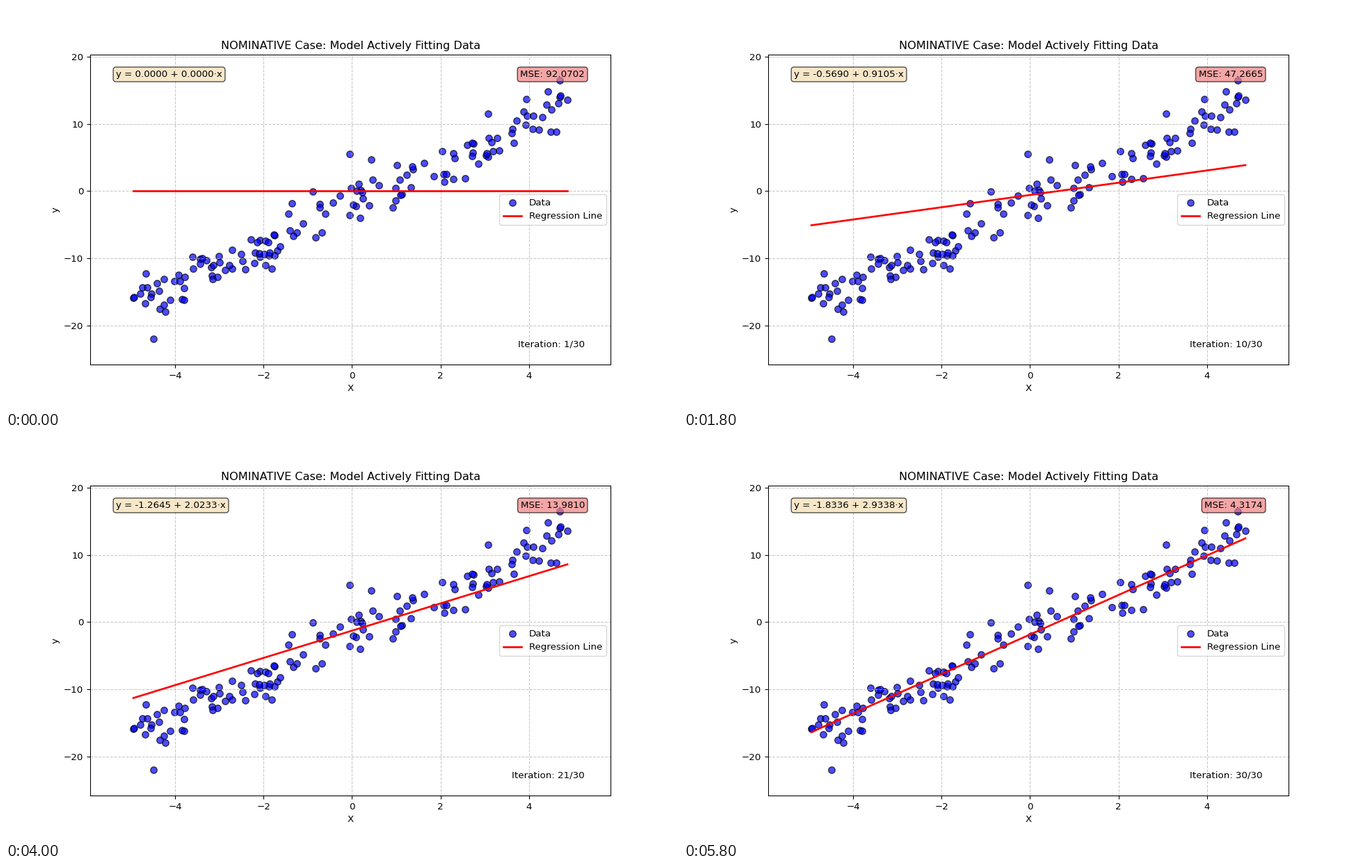
These frames come from a looping animation (966 by 580 pixels, 6000 ms). A matplotlib script:

```python
import numpy as np
import matplotlib.pyplot as plt
from matplotlib.animation import FuncAnimation

STEPS = 30
DPI = 96.6

# Noisy samples of y = 3x - 2
rng = np.random.RandomState(42)
x = 10 * rng.rand(150) - 5
y = 3 * x - 2 + 2 * rng.randn(150)
slope, intercept = np.polyfit(x, y, 1)
ends = np.array([x.min(), x.max()])


def padded(values, share=0.1):
    pad = share * np.ptp(values)
    return values.min() - pad, values.max() + pad


fig, ax = plt.subplots(figsize=(10.00001, 6.0042), dpi=DPI)
ax.scatter(x, y, s=50, color="blue", alpha=0.7, edgecolor="k", label="Data")
line, = ax.plot(ends, 0 * ends, "r-", lw=2, label="Regression Line")
ax.set(xlim=padded(x), ylim=padded(y), xlabel="X", ylabel="y",
       title="NOMINATIVE Case: Model Actively Fitting Data")
ax.grid(True, linestyle="--", alpha=0.7)
ax.legend(loc="center right")


def note(px, py, ha, va, fill=None):
    box = dict(boxstyle="round", facecolor=fill, alpha=0.7) if fill else None
    return ax.text(px, py, "", transform=ax.transAxes, ha=ha, va=va, bbox=box)


equation = note(0.05, 0.95, "left", "top", "wheat")
error = note(0.95, 0.95, "right", "top", "lightcoral")
counter = note(0.95, 0.05, "right", "bottom")


def update(step):
    t = step / STEPS
    a, b = t * intercept + 0.0, t * slope  # + 0.0 avoids "-0.0000"
    line.set_ydata(a + b * ends)
    equation.set_text(f"y = {a:.4f} + {b:.4f}·x")
    error.set_text(f"MSE: {np.mean((y - a - b * x) ** 2):.4f}")
    counter.set_text(f"Iteration: {step + 1}/{STEPS}")
    return line, equation, error, counter


anim = FuncAnimation(fig, update, frames=STEPS, interval=200, repeat=True)
plt.show()
```
